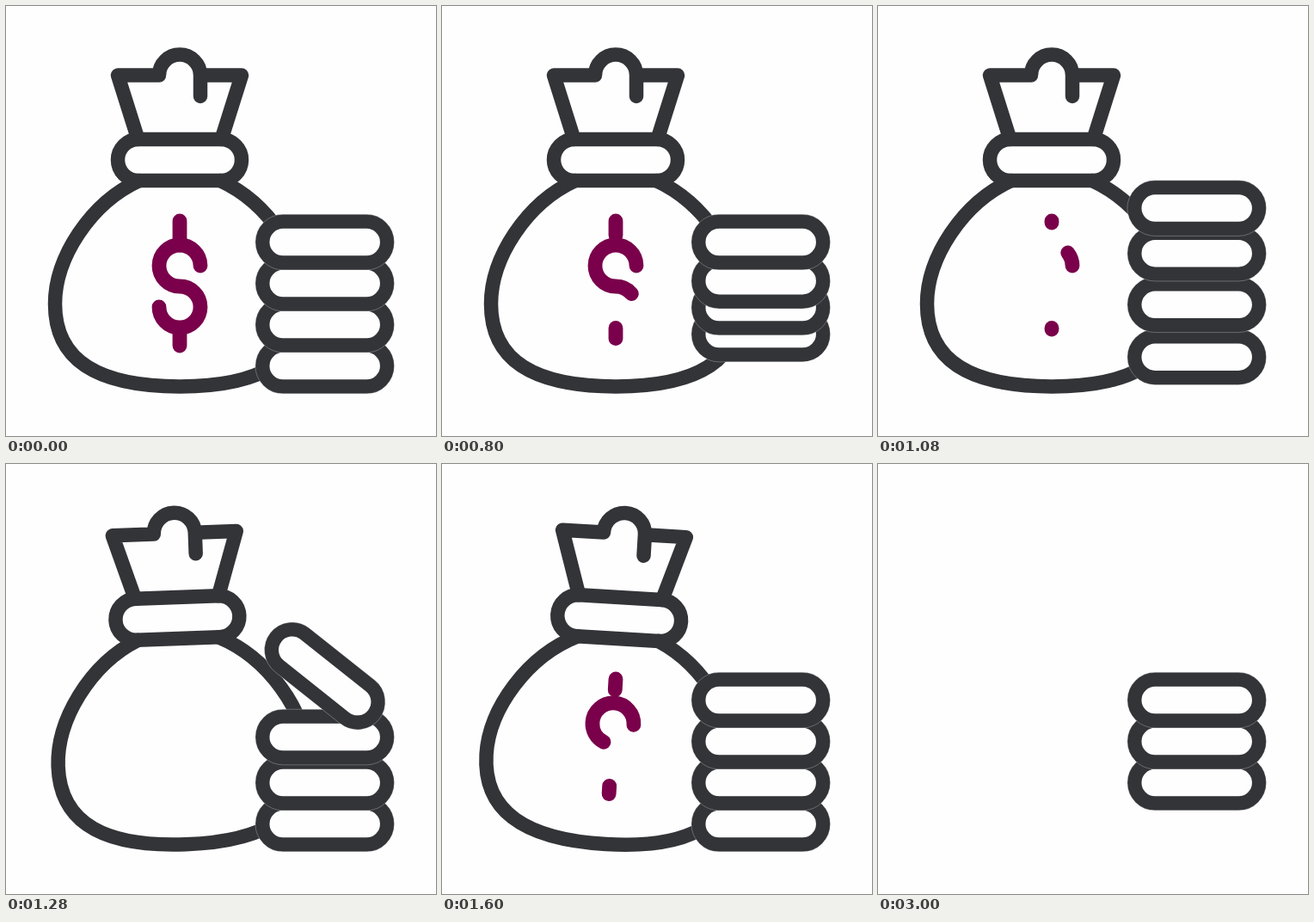
Write an HTML page that moves like this. It is 500 px wide and 500 px high and loops after 3.04 s.

```html
<!DOCTYPE html>
<html lang="en">
<head>
<meta charset="utf-8">
<title>Money bag and coins</title>
<style>
  html, body { margin: 0; width: 100%; height: 100%; overflow: hidden; background: #fefefe; }
  svg { display: block; width: 100vw; height: 100vh; }
  .line { fill: none; stroke: #333438; stroke-width: 16.5; stroke-linecap: round; stroke-linejoin: round; }
  .coin .line { fill: #fefefe; }
  .seam { fill: none; stroke: #fefefe; stroke-opacity: .45; stroke-width: .6; }
  #dollar path { fill: none; stroke: #7a004b; stroke-width: 16.8; stroke-linecap: round; }
</style>
</head>
<body>
<svg viewBox="0 0 500 500">
  <g id="bag">
    <path class="line" d="M155 203C98 229 57 293 57 346.5C57 414 110 442.4 202 442.4C294 442.4 347 414 347 346.5C347 293 306 229 249 203"/>
    <rect class="line" x="130" y="155" width="144" height="48" rx="24"/>
    <path class="line" d="M153.5 155L130 80.6H178A24 24 0 0 1 226 80.6V105M226 80.6H274L250.5 155"/>
    <g id="dollar">
      <path pathLength="1" d="M202 250V278"/>
      <path pathLength="1" d="M226 302A24 24 0 1 0 202 326A24 24 0 1 1 178 350"/>
      <path pathLength="1" d="M202 374.5V395"/>
    </g>
  </g>
  <g id="stack"></g>
</svg>
<script>
const LOOP = 3040, STEP = 40, BLANK_AT = 3000;
const COIN_X = 370.7, TOP_Y = 274.6, PITCH = 48;
const NS = "http://www.w3.org/2000/svg";
const bag = document.getElementById("bag");
const stack = document.getElementById("stack");
const strokes = document.querySelectorAll("#dollar path");

const smooth = p => p * p * (3 - 2 * p);
const easeOut = p => p * (1 + p - p * p);

// keys: [time, value] pairs in order of time
function track(keys, t, ease = smooth) {
  if (t <= keys[0][0]) return keys[0][1];
  for (let i = 1; i < keys.length; i++) {
    const [t0, a] = keys[i - 1], [t1, b] = keys[i];
    if (t < t1) return a + (b - a) * ease((t - t0) / (t1 - t0));
  }
  return keys[keys.length - 1][1];
}

const SWAY = [[1100, 0], [1350, -2.6], [1610, 3.4], [1960, 0]];
const HOP = [[600, 0], [840, -40], [1200, 0]];
const TOSS = [[840, 0], [1080, -39.5], [1190, -40], [1440, 0]];
const FLIP = [[1080, 0], [1365, -180]];
const ERASE = [[600, 1], [1200, 0]];
const REDRAW = [[1280, 0], [1960, 1]];
const HOP_DELAY = 80;

function addRect(parent, name, w, h) {
  const r = document.createElementNS(NS, "rect");
  const attrs = { class: name, x: -w / 2, y: -h / 2, width: w, height: h, rx: h / 2 };
  for (const k in attrs) r.setAttribute(k, attrs[k]);
  parent.append(r);
}

// Built bottom first, so upper coins cover lower ones.
const coins = [3, 2, 1, 0].map(row => {
  const el = document.createElementNS(NS, "g");
  el.setAttribute("class", "coin");
  addRect(el, "line", 145, 48);
  addRect(el, "seam", 161.6, 64.6);
  stack.append(el);
  return { el, row };
});

function render(t) {
  const blank = t >= BLANK_AT;
  bag.style.display = coins[0].el.style.display = blank ? "none" : "";
  bag.setAttribute("transform", `rotate(${track(SWAY, t)} 202 250)`);

  const drawn = t < 1240 ? track(ERASE, t, easeOut) : track(REDRAW, t);
  for (const s of strokes) {
    s.style.display = drawn > 0 ? "" : "none";
    s.setAttribute("stroke-dasharray", `${drawn} 2`);
  }

  // The lowest coin's hop is already under way when the opening rest ends.
  for (const { el, row } of coins) {
    const top = row === 0;
    const hopTime = t < 640 ? 0 : t - (3 - row) * HOP_DELAY;
    const lift = top ? track(TOSS, t) : track(HOP, hopTime);
    const turn = top ? track(FLIP, t) : 0;
    const y = TOP_Y + row * PITCH + lift;
    el.setAttribute("transform", `translate(${COIN_X} ${y}) rotate(${turn})`);
  }
}

const start = performance.now();
function tick() {
  const t = (performance.now() - start) % LOOP;
  render(Math.floor(t / STEP) * STEP);
  requestAnimationFrame(tick);
}
tick();
</script>
</body>
</html>
```
